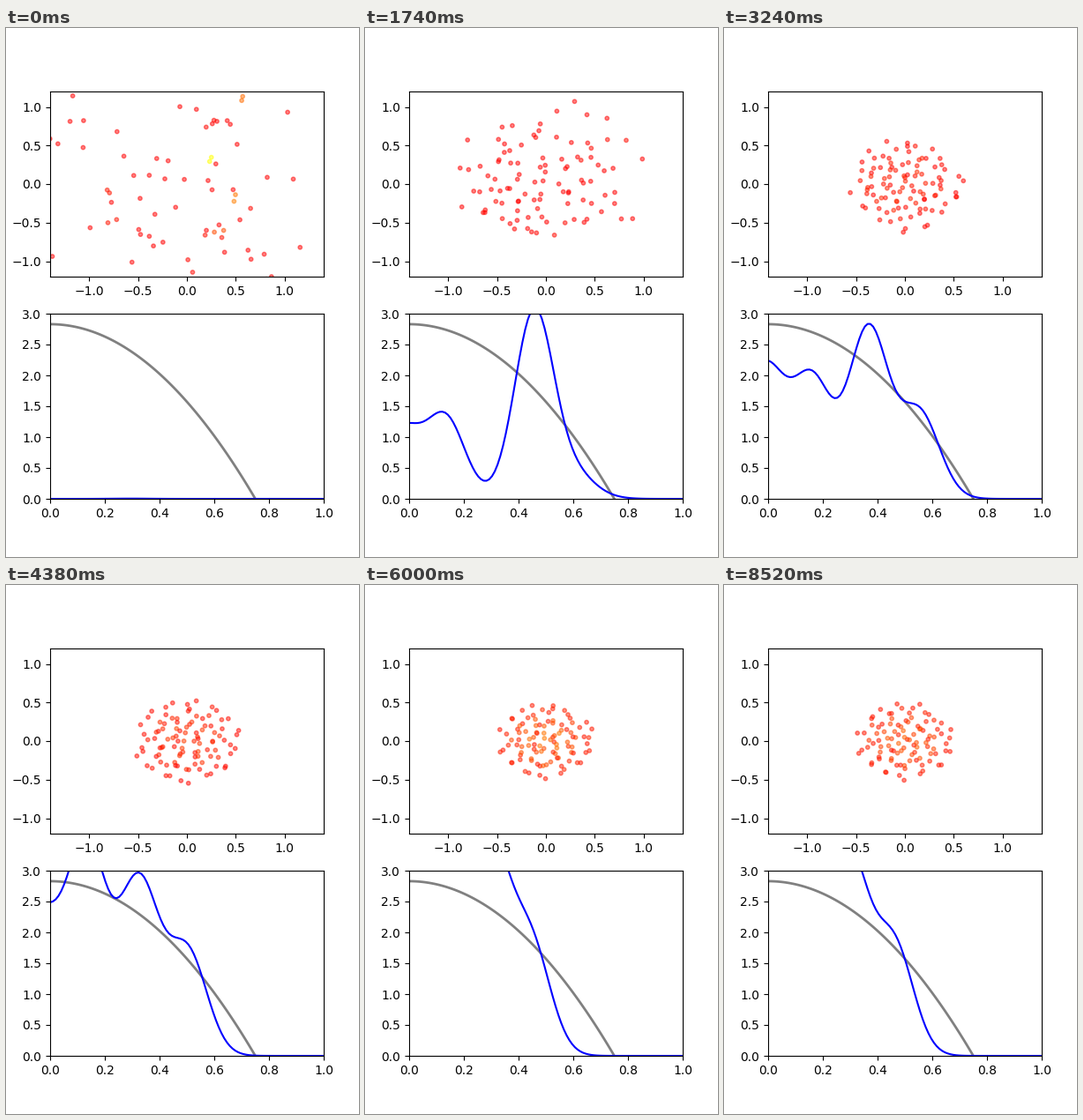
A matplotlib script for the animation above (8.58 s loop, 400 by 600 pixels).

```python
import math

import numpy as np
import matplotlib.pyplot as plt
from matplotlib.animation import FuncAnimation

# Smoothed-particle hydrodynamics of a collapsing toy star
N = 100          # particles
MASS = 2.0       # star mass
R = 0.75         # star radius
H = 0.1          # smoothing length
K = 0.1          # equation of state constant
POLY = 1         # polytropic index
NU = 1.0         # damping
DT = 0.01
FRAMES = 143
INTERVAL = 60
STEPS = 8        # time steps per frame

m = MASS / N
lam = (2 * K * (1 + POLY) * math.pi ** (-3 / (2 * POLY))
       * (MASS * math.gamma(2.5 + POLY) / R ** 3 / math.gamma(1 + POLY)) ** (1 / POLY)
       / R ** 2)


def separations(a, b):
    return a[:, None, :] - b[None, :, :]


def kernel(d):
    return np.exp(-(d ** 2).sum(-1) / H ** 2) / (H * math.sqrt(math.pi)) ** 3


def density(at, pos):
    return m * kernel(separations(at, pos)).sum(1)


def acceleration(pos, vel):
    d = separations(pos, pos)
    w = kernel(d)
    rho = m * w.sum(1)
    q = K * rho ** (1 + 1 / POLY) / rho ** 2
    grad = -2 / H ** 2 * w[..., None] * d
    push = -m * ((q[:, None] + q[None, :])[..., None] * grad).sum(1)
    return push - lam * pos - NU * vel


def simulate():
    np.random.seed(42)
    pos = np.random.randn(N, 3)
    vel = np.zeros_like(pos)
    acc = acceleration(pos, vel)
    track = []
    for i in range(FRAMES * STEPS):
        vel += acc * DT / 2
        pos += vel * DT
        acc = acceleration(pos, vel)
        vel += acc * DT / 2
        if i % STEPS == 0:
            track.append(pos.copy())
    return track


def heat(pos):
    return np.minimum((density(pos, pos) - 3) / 3, 1)


track = simulate()
radius = np.linspace(0, 1, 100)
ray = np.zeros((100, 3))
ray[:, 0] = radius

fig, (top, bottom) = plt.subplots(2, 1, figsize=(4, 6), dpi=100)
top.set(xlim=(-1.4, 1.4), ylim=(-1.2, 1.2))
bottom.set(xlim=(0, 1), ylim=(0, 3))

start = track[0]
dots = top.scatter(start[:, 0], start[:, 1], c=heat(start),
                   cmap="autumn", s=10, alpha=0.5)
bottom.plot(radius, lam / (4 * K) * (R ** 2 - radius ** 2), color="gray", lw=2)
profile, = bottom.plot(radius, density(ray, start), color="blue")


def draw(i):
    pos = track[i]
    dots.set_offsets(pos[:, :2])
    dots.set_array(heat(pos))
    profile.set_ydata(density(ray, pos))
    return dots, profile


anim = FuncAnimation(fig, draw, frames=FRAMES, interval=INTERVAL,
                     repeat=True, repeat_delay=0)
plt.show()
```
